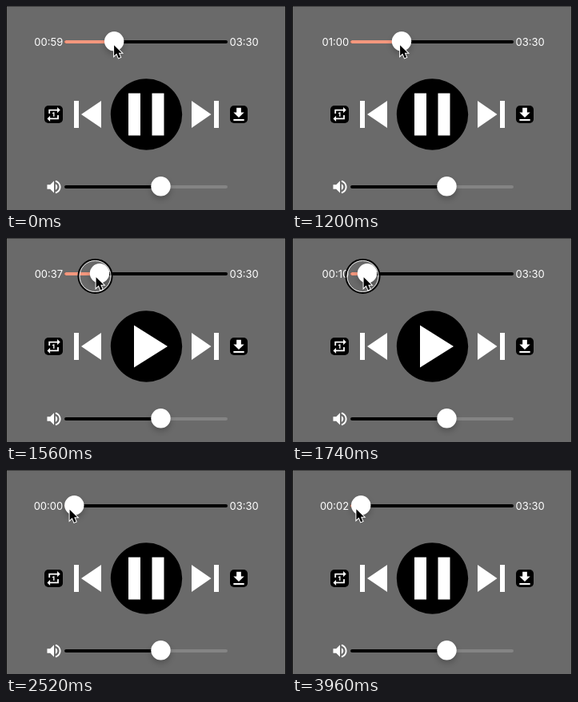
Write an HTML page with a canvas that moves like this. It is 350x256 px and loops after 3.99 s.

```html
<!DOCTYPE html>
<html lang="en">
<head>
<meta charset="utf-8">
<title>Audio player</title>
<style>
  html, body { margin: 0; width: 100%; height: 100%; overflow: hidden; background: #6a6a6a; }
  canvas { display: block; width: 350px; height: 256px; }
</style>
</head>
<body>
<canvas id="stage"></canvas>
<script>
const W = 350, H = 256, LOOP = 3990, STEP = 30;
const PRESS = 1260, RELEASE = 1950;
const TRACK = { left: 75, right: 275, min: 85, span: 180, seconds: 210 };

const canvas = document.getElementById('stage');
const ratio = window.devicePixelRatio || 1;
canvas.width = W * ratio;
canvas.height = H * ratio;
const ctx = canvas.getContext('2d');

const icons = {
  repeat: new Path2D('M7 7h10v3l4-4-4-4v3H5v6h2V7zm10 10H7v-3l-4 4 4 4v-3h12v-6h-2v4zm-4-2V9h-1l-2 1v1h1.5v4H13z'),
  download: new Path2D('M19 9h-4V3H9v6H5l7 7 7-7zM5 18v2h14v-2H5z'),
  volume: new Path2D('M3 9v6h4l5 5V4L7 9H3zm13.5 3c0-1.77-1-3.3-2.5-4v8c1.5-.7 2.5-2.2 2.5-4zM14 3.2v2.1c2.9.9 5 3.5 5 6.7s-2.1 5.8-5 6.7v2.1c4-.9 7-4.5 7-8.8s-3-7.9-7-8.8z')
};

// Drag positions as [time, x]
const thumbDrag = [[1260, 137], [1350, 135], [1440, 129.5], [1500, 123.6], [1560, 117],
  [1650, 105.5], [1740, 94], [1800, 88], [1860, 84.6]];
const cursorDrag = [[1260, 134.5], [1350, 131.5], [1440, 125], [1500, 118.8], [1560, 112],
  [1650, 100.5], [1740, 89], [1800, 83.5], [1860, 80.8], [1950, 79]];

function along(keys, t) {
  const next = keys.findIndex(key => key[0] > t);
  if (next < 0) return keys[keys.length - 1][1];
  if (next === 0) return keys[0][1];
  const [t0, x0] = keys[next - 1], [t1, x1] = keys[next];
  return x0 + (x1 - x0) * (t - t0) / (t1 - t0);
}

function clock(seconds) {
  const pad = n => String(n).padStart(2, '0');
  return pad(Math.floor(seconds / 60)) + ':' + pad(seconds % 60);
}

function stateAt(t) {
  const dragging = t >= PRESS && t < RELEASE;
  let thumb, seconds;
  if (t < PRESS) {
    thumb = t < 270 ? 135.2 : t < 1200 ? 136 : 137;
    seconds = t < 630 ? 59 : 60;
  } else if (dragging) {
    thumb = along(thumbDrag, t);
    seconds = Math.max(0, Math.floor((thumb - TRACK.min) / TRACK.span * TRACK.seconds));
  } else {
    thumb = t < 2520 ? 84.6 : t < 3450 ? 85.3 : 86.2;
    seconds = t < 3090 ? 0 : t < 3960 ? 1 : 2;
  }
  const moved = t >= 3840;
  return {
    dragging, thumb, seconds,
    cursorX: moved ? 79.8 : along(cursorDrag, t),
    cursorY: t >= RELEASE && !moved ? 48.5 : 48
  };
}

function polygon(color, ...points) {
  ctx.fillStyle = color;
  ctx.beginPath();
  points.forEach(([x, y]) => ctx.lineTo(x, y));
  ctx.closePath();
  ctx.fill();
}

function box(color, x, y, w, h, r = 0) {
  ctx.fillStyle = color;
  ctx.beginPath();
  ctx.roundRect(x, y, w, h, r);
  ctx.fill();
}

function disc(color, x, y, r) {
  ctx.fillStyle = color;
  ctx.beginPath();
  ctx.arc(x, y, r, 0, Math.PI * 2);
  ctx.fill();
}

function ring(color, x, y, r, width) {
  ctx.strokeStyle = color;
  ctx.lineWidth = width;
  ctx.beginPath();
  ctx.arc(x, y, r, 0, Math.PI * 2);
  ctx.stroke();
}

function icon(path, x, y, scale) {
  ctx.save();
  ctx.translate(x, y);
  ctx.scale(scale, scale);
  ctx.translate(-12, -12);
  ctx.fillStyle = '#fff';
  ctx.fill(path);
  ctx.restore();
}

function slider(y, x, done, rest) {
  ctx.lineWidth = 4;
  ctx.lineCap = 'round';
  [[rest, TRACK.right], [done, x]].forEach(([color, end]) => {
    ctx.strokeStyle = color;
    ctx.beginPath();
    ctx.moveTo(TRACK.left, y);
    ctx.lineTo(end, y);
    ctx.stroke();
  });
  ctx.save();
  ctx.shadowColor = 'rgba(0,0,0,.22)';
  ctx.shadowBlur = 7 * ratio;
  ctx.shadowOffsetY = 4 * ratio;
  disc('#fff', x, y - 0.7, 12.2);
  ctx.restore();
}

function label(text, x, align) {
  ctx.font = '13px Inter, Roboto, sans-serif';
  ctx.fillStyle = '#fff';
  ctx.textAlign = align;
  ctx.fillText(text, x, 49.8);
}

function drawButtons(playing) {
  box('#000', 48, 125, 23, 22, 5);
  icon(icons.repeat, 59.6, 136, 0.9);
  box('#000', 280, 125, 22, 22, 5);
  icon(icons.download, 291, 136.3, 0.95);

  box('#fff', 85, 119, 6, 34);
  polygon('#fff', [119, 119], [119, 153], [94, 136]);
  polygon('#fff', [232, 119], [232, 153], [256.5, 136]);
  box('#fff', 260, 119, 6, 34);

  disc('#000', 175.5, 136, 44.7);
  if (playing) {
    box('#fff', 153, 109.5, 15, 53);
    box('#fff', 182.5, 109.5, 15, 53);
  } else {
    polygon('#fff', [160, 109.5], [202, 136], [160, 162.5]);
  }
}

function drawCursor(x, y) {
  ctx.save();
  ctx.translate(x, y);
  ctx.lineJoin = 'miter';
  ctx.lineWidth = 2;
  ctx.strokeStyle = '#fff';
  const shape = new Path2D('M.6 1.2V14.6L3.8 11.6L6.2 17.2L8.6 16.2L6.2 10.8H10.2Z');
  ctx.stroke(shape);
  ctx.fillStyle = '#000';
  ctx.fill(shape);
  ctx.restore();
}

function draw(t) {
  const s = stateAt(t);
  ctx.setTransform(ratio, 0, 0, ratio, 0, 0);
  box('#6a6a6a', 0, 0, W, H);
  box('#111', 0, 0, 1, H);
  box('#111', W - 1, 0, 1, H);
  box('rgba(0,0,0,.4)', 0, 0, W, 1);

  label(clock(s.seconds), 71.2, 'right');
  label('03:30', 279.5, 'left');
  slider(45, s.thumb, '#f4977d', '#000');
  drawButtons(!s.dragging);
  icon(icons.volume, 60, 227, 0.95);
  slider(227, 193.5, '#000', '#848484');

  if (s.dragging) {
    ring('#000', s.cursorX - 0.5, s.cursorY, 21, 2);
    ring('#e8e8e8', s.cursorX - 0.5, s.cursorY, 19.5, 1);
  }
  drawCursor(s.cursorX, s.cursorY);
}

const start = performance.now();
function tick() {
  const t = (performance.now() - start) % LOOP;
  draw(Math.floor(t / STEP) * STEP);
  requestAnimationFrame(tick);
}
tick();
</script>
</body>
</html>
```
